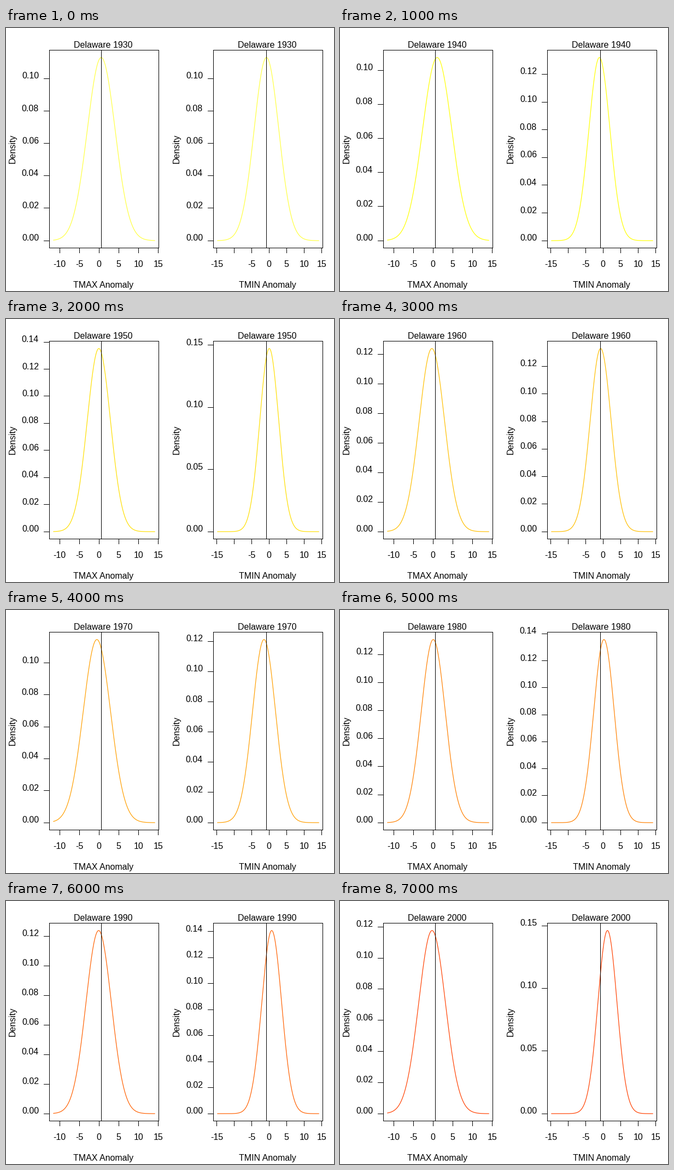
A matplotlib script for the animation above (8 s loop, 600 px wide and 480 px high).

```python
import math

import matplotlib.pyplot as plt
import numpy as np
from matplotlib.animation import FuncAnimation

W, H, DPI = 600, 480, 100
PX = 72 / DPI                              # points per pixel
FONT = 16
TOP, BOTTOM, BOX_W = 40.5, 401.5, 200
PAD = 0.04 / 1.08                          # share of the box left free at each end
PEAK_Y = TOP + PAD * (BOTTOM - TOP)
ZERO_Y = BOTTOM - PAD * (BOTTOM - TOP)
TICK = 10

plt.rcParams["font.family"] = "Liberation Sans"
plt.rcParams["font.size"] = FONT * PX

YEARS = range(1930, 2010, 10)
KEY_YEARS = [1930, 1940, 1950, 1970, 1980, 2000]

fig = plt.figure(figsize=(W / DPI, H / DPI), dpi=DPI, facecolor="white")
ax = fig.add_axes([0, 0, 1, 1])


def crisp(v):
    """Centre of the pixel that holds v."""
    return math.floor(v) + 0.5


def line(xs, ys, color="black", width=1.0):
    ax.plot(xs, ys, color=color, lw=width * PX, snap=False,
            solid_capstyle="projecting")


def label(x, y, s, ha="center", **kw):
    ax.text(x, y, s, ha=ha, va="baseline", **kw)


def text_width(s):
    return FONT * sum(0.333 if c == "-" else 0.556 for c in s)


def heat(i):
    """Pale yellow first, then pure yellow towards red."""
    return (1, 1, 0.25) if i == 0 else (1, (9 - i) / 8, 0)


class Panel:
    def __init__(self, left, name, lo, hi, means, sds):
        self.left, self.name, self.lo, self.hi = left, name, lo, hi
        self.means, self.sds = means, sds
        self.scale = BOX_W * (1 - 2 * PAD) / (hi - lo)
        self.zero = left + PAD * BOX_W - lo * self.scale

    def x(self, value):
        return self.zero + value * self.scale

    def draw(self, i):
        year, right = YEARS[i], self.left + BOX_W
        mean = np.interp(year, KEY_YEARS, self.means)
        sd = np.interp(year, KEY_YEARS, self.sds)

        v = np.linspace(self.lo, self.hi, 300)
        shape = np.exp(-((v - mean) / sd) ** 2 / 2)
        line(self.x(v), ZERO_Y - (ZERO_Y - PEAK_Y) * shape, heat(i), 1.2)

        marker = crisp(self.x(self.means[0]))
        line([marker] * 2, [TOP, BOTTOM])
        line([self.left, right, right, self.left, self.left],
             [TOP, TOP, BOTTOM, BOTTOM, TOP])

        self.draw_x_axis(right)
        self.draw_y_axis(1 / (sd * math.sqrt(2 * math.pi)))
        label(self.left + 98.3, 36, f"Delaware {year}")
        label(self.left + 98.8, 474, f"{self.name} Anomaly")
        label(self.left - 62.5, 220, "Density", rotation=90,
              rotation_mode="anchor")

    def draw_x_axis(self, right):
        free = -math.inf                   # labels too close to the last are skipped
        for t in range(-15, 16, 5):
            tx = self.x(t)
            if not self.left < tx < right:
                continue
            line([crisp(tx)] * 2, [BOTTOM, BOTTOM + TICK - 1])
            half = text_width(str(t)) / 2
            if tx - half > free:
                label(tx - 0.3, 436, str(t))
                free = tx + half + 0.833 * FONT

    def draw_y_axis(self, peak):
        step = 0.02 if peak < 0.144 else 0.05
        for d in np.arange(0, peak * 1.04, step):
            ty = ZERO_Y - (ZERO_Y - PEAK_Y) * d / peak
            line([self.left - TICK, self.left], [crisp(ty)] * 2)
            label(self.left - 19.5, round(ty), f"{d:.2f}", ha="right")


PANELS = [
    Panel(79.5, "TMAX", -11.62, 14.1,
          [0.5, 1.0, -0.1, -0.6, 0.0, -0.3],
          [3.53, 3.71, 2.95, 3.48, 3.05, 3.39]),
    Panel(379.5, "TMIN", -14.8, 14.15,
          [-0.8, -1.1, 0.0, -1.5, 0.2, 1.2],
          [3.53, 3.02, 2.71, 3.29, 2.94, 2.73]),
]


def draw(i):
    ax.clear()
    ax.set_xlim(0, W)
    ax.set_ylim(H, 0)
    ax.axis("off")
    for panel in PANELS:
        panel.draw(i)
    return []


anim = FuncAnimation(fig, draw, frames=len(YEARS), interval=1000,
                     repeat=True, repeat_delay=0, blit=False)
plt.show()
```
